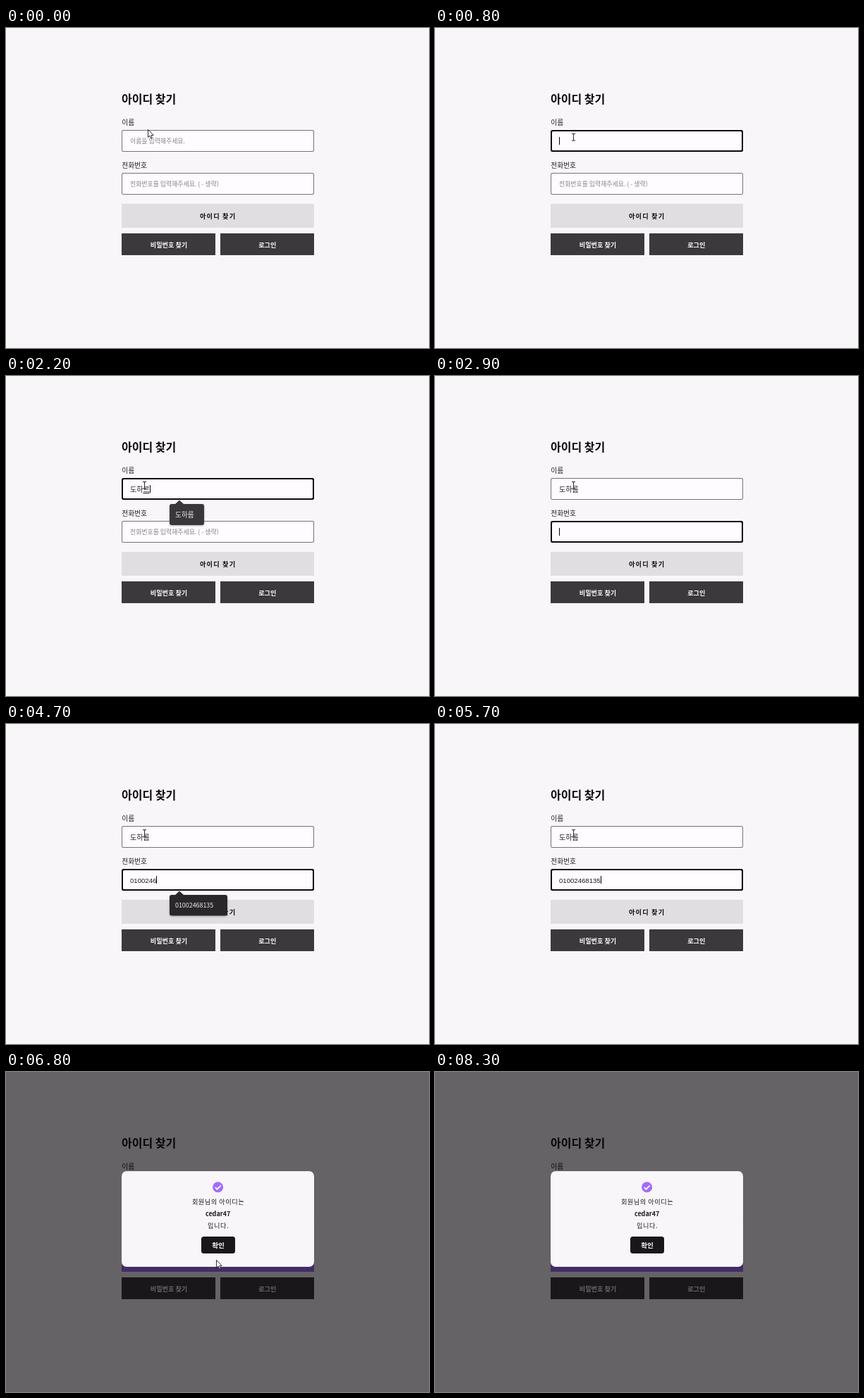
An HTML page with a canvas for the animation above (9900 ms loop, 600x455 px).

```html
<!DOCTYPE html>
<html lang="ko">
<head>
<meta charset="utf-8">
<title>아이디 찾기</title>
<style>
html, body { margin: 0; width: 100%; height: 100%; overflow: hidden; background: #f8f6f9; }
canvas { display: block; width: 600px; height: 455px; }
</style>
</head>
<body>
<canvas id="stage" width="600" height="455"></canvas>
<script>
const ctx = document.getElementById('stage').getContext('2d');
const LOOP = 9900, STEP = 100;
const KR = '"Noto Sans CJK KR", "Noto Sans CJK", sans-serif';
const ARIAL = '"Liberation Sans", ' + KR;
const BG = '#f8f6f9', DARK = '#3b393c', PURPLE = '#a46bfe';
const NAME = '도하름', PHONE = '01002468135', USER = 'cedar47';

// [time, composed text]
const NAME_KEYS = [[1300, 'ㄷ'], [1500, '도'], [1800, '돟'], [1900, '도하'],
  [2100, '도할'], [2200, '도하르'], [2300, NAME]];
const DIGIT_TIMES = [3300, 3500, 3700, 3900, 4100, 4200, 4700, 5000, 5200, 5400, 5600];

// [time, x, y]
const PATH = [[0, 201, 144.5], [300, 196.5, 155], [6000, 196.5, 155], [6200, 225, 192],
  [6400, 285, 258], [6600, 298, 267.5], [7600, 298, 267.5], [7700, 301, 265],
  [7900, 301, 265], [8000, 313, 225], [8100, 335, 110], [8200, 355, 2]];

const clamp = v => Math.max(0, Math.min(1, v));
const ramp = (t, from, to) => clamp((t - from) / (to - from));

function box(x, y, w, h, fill, r = 0) {
  ctx.fillStyle = fill;
  ctx.beginPath();
  ctx.roundRect(x, y, w, h, r);
  ctx.fill();
}

function text(str, x, cy, size, { color = '#1c1a1c', weight = 400, align = 'left', font = KR, gap = 0 } = {}) {
  ctx.font = `${weight} ${size}px ${font}`;
  ctx.letterSpacing = gap + 'px';
  ctx.textAlign = align;
  ctx.fillStyle = color;
  ctx.fillText(str, x, cy + size * 0.37);
  const width = ctx.measureText(str).width;
  ctx.letterSpacing = '0px';
  return width;
}

function field(y, value, hint, focused, style, composing) {
  box(164, y, 273, 31, focused ? '#0b090b' : '#757376', 2.5);
  const b = focused ? 2 : 1;
  box(164 + b, y + b, 273 - 2 * b, 31 - 2 * b, '#fefcff', 1.5);
  const cy = y + 16;
  let width = 0;
  if (value) width = text(value, 176, cy, style.size, style);
  else if (!focused) text(hint, 176, cy, 8.9, { color: '#858386' });
  if (composing) {
    const last = ctx.measureText(value.slice(-1)).width;
    box(176 + width - last, cy + 5, last, 1, '#1c1a1c');
  }
  if (focused) box(Math.round(176 + width), cy - 6, 1, 11, '#000');
}

function popup(y, w, h, label, size, fill, alpha) {
  if (alpha <= 0) return;
  ctx.save();
  ctx.globalAlpha = alpha;
  ctx.shadowColor = 'rgba(0,0,0,.3)';
  ctx.shadowBlur = 3;
  ctx.shadowOffsetY = 1;
  box(232, y, w, h, fill, 3);
  ctx.shadowColor = 'transparent';
  ctx.beginPath();
  ctx.moveTo(239.5, y + 0.5);
  ctx.lineTo(246, y - 5.5);
  ctx.lineTo(252.5, y + 0.5);
  ctx.fill();
  text(label, 240, y + h / 2, size, { color: '#f0eef1' });
  ctx.restore();
}

function trace(points) {
  ctx.beginPath();
  points.forEach(([x, y]) => ctx.lineTo(x, y));
  ctx.closePath();
}

function outlined() {
  ctx.fillStyle = '#fff';
  ctx.strokeStyle = '#1a181a';
  ctx.lineWidth = 0.9;
  ctx.lineJoin = 'round';
  ctx.fill();
  ctx.stroke();
}

const cursors = {
  arrow() {
    trace([[0.5, 0], [0.5, 11], [3, 8.7], [4.8, 12.6], [6.5, 11.9], [4.8, 8.1], [8.2, 8]]);
    outlined();
  },
  beam() {
    ctx.strokeStyle = '#2a282a';
    ctx.lineWidth = 1;
    ctx.beginPath();
    ctx.moveTo(-2.5, -4.5); ctx.lineTo(2.5, -4.5);
    ctx.moveTo(0, -4.5); ctx.lineTo(0, 5);
    ctx.moveTo(-2.5, 5); ctx.lineTo(2.5, 5);
    ctx.stroke();
  },
  hand() {
    ctx.beginPath();
    ctx.moveTo(-1.2, 9);
    ctx.lineTo(-1.2, 1.2);
    ctx.quadraticCurveTo(0, -0.6, 1.2, 1.2);
    ctx.lineTo(1.2, 6);
    ctx.quadraticCurveTo(2.8, 4.8, 3.6, 6.4);
    ctx.quadraticCurveTo(5, 5.4, 5.7, 7);
    ctx.quadraticCurveTo(7.3, 6.6, 7.3, 8.4);
    ctx.lineTo(7.1, 12);
    ctx.lineTo(5.8, 16.5);
    ctx.lineTo(-0.4, 16.5);
    ctx.lineTo(-4.2, 10.6);
    ctx.quadraticCurveTo(-4, 8.6, -2.4, 9.6);
    ctx.closePath();
    outlined();
    ctx.lineWidth = 0.6;
    ctx.beginPath();
    [1.2, 3.6, 5.6].forEach(x => { ctx.moveTo(x, 6.4); ctx.lineTo(x, 9.4); });
    ctx.stroke();
  }
};

function pointer(t) {
  if (t > 8200) return;
  const i = Math.max(1, PATH.findIndex(p => p[0] >= t));
  const [t0, x0, y0] = PATH[i - 1], [t1, x1, y1] = PATH[i];
  const k = ramp(t, t0, t1);
  const x = x0 + (x1 - x0) * k, y = y0 + (y1 - y0) * k;
  let kind = 'arrow';
  if (t < 6800) {
    if ((y >= 145 && y < 176) || (y >= 206 && y < 237)) kind = 'beam';
    else if (y >= 250) kind = 'hand';
  }
  ctx.save();
  ctx.translate(x, y);
  cursors[kind]();
  ctx.restore();
}

function form(t) {
  text('아이디 찾기', 164, 101.5, 16, { weight: 700, color: '#0b090b' });
  text('이름', 164.3, 134.5, 9.7);
  text('전화번호', 164.3, 195.5, 9.7);

  const key = NAME_KEYS.filter(k => k[0] <= t).pop();
  const digits = PHONE.slice(0, DIGIT_TIMES.filter(d => d <= t).length);
  field(145, key ? key[1] : '', '이름을 입력해주세요.', t >= 600 && t < 2800,
    { size: 10 }, key && t < 2800);
  field(206, digits, '전화번호를 입력해주세요. ( - 생략)', t >= 2800 && t < 6600,
    { size: 9.6, font: ARIAL });

  const hover = ramp(t, 6300, 6600);
  box(164, 250, 273, 34, '#e1dee1');
  ctx.globalAlpha = hover;
  box(164, 250, 273, 34, PURPLE);
  ctx.globalAlpha = 1;
  text('아이디 찾기', 275, 267.5, 9.2,
    { weight: 700, gap: 1.15, color: hover > 0.5 ? '#fff' : '#0b090b' });

  box(164, 292, 133, 31, DARK);
  box(304, 292, 133, 31, DARK);
  const link = { weight: 700, align: 'center', color: '#fefcff' };
  text('비밀번호 찾기', 231, 308.5, 9.1, link);
  text('로그인', 370.7, 308.5, 9.1, link);

  popup(182, 49, 30, NAME, 9.7, '#39373a', ramp(t, 1200, 1500) * (1 - ramp(t, 2300, 2500)));
  popup(243, 82, 29.5, PHONE, 8.9, '#29272a', t < 3300 ? 0 : 1 - ramp(t, 5500, 5700));
}

function modal() {
  box(0, 0, 600, 455, 'rgba(2,0,2,.595)');
  box(164, 141, 273, 136, BG, 7);
  ctx.fillStyle = PURPLE;
  ctx.beginPath();
  ctx.arc(300.6, 163.8, 7.5, 0, Math.PI * 2);
  ctx.fill();
  ctx.strokeStyle = '#fff';
  ctx.lineWidth = 1.7;
  ctx.lineJoin = 'miter';
  ctx.beginPath();
  ctx.moveTo(296.7, 164);
  ctx.lineTo(299.4, 166.7);
  ctx.lineTo(304.8, 161.3);
  ctx.stroke();
  const line = { align: 'center', gap: 0.5 };
  text('회원님의 아이디는', 301, 184.5, 9.2, line);
  text(USER, 300.6, 201.5, 9, { weight: 700, align: 'center' });
  text('입니다.', 301, 218.5, 9.2, line);
  box(277, 234, 48, 24, '#1a171a', 3.5);
  text('확인', 301, 246.5, 9.6, { weight: 700, align: 'center', color: '#fff' });
}

function draw(t) {
  box(0, 0, 600, 455, BG);
  form(t);
  if (t >= 6800) modal();
  pointer(t);
}

const start = performance.now();
function tick() {
  const t = (performance.now() - start) % LOOP;
  draw(Math.floor(t / STEP) * STEP);
  requestAnimationFrame(tick);
}
tick();
</script>
</body>
</html>
```
